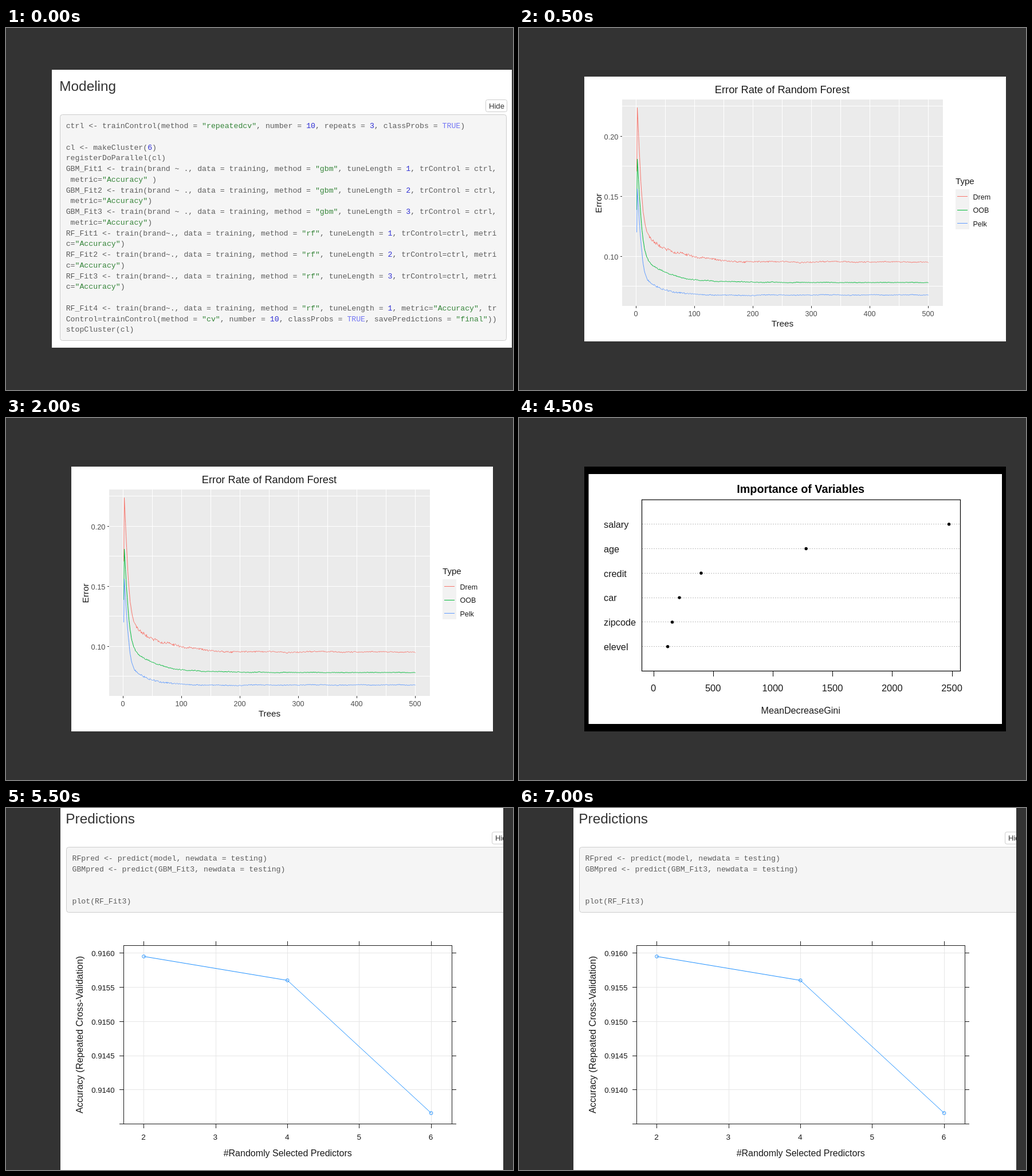
An HTML page for the animation above (8 s loop, 885x633 px).

```html
<!DOCTYPE html>
<html lang="en">
<head>
<meta charset="utf-8">
<title>Modeling slides</title>
<style>
  html, body { margin: 0; width: 100%; height: 100%; overflow: hidden; background: #333; }
  svg { display: block; width: 885px; height: 633px; }
  text { font-family: "Liberation Sans", Arial, sans-serif; white-space: pre; }
  .code { font: 13.2px "Liberation Mono", "Courier New", monospace; fill: #5c5c5c; }
  .str { fill: #36853a; }
  .num { fill: #3030d4; }
  .lit { fill: #7376f4; }
</style>
</head>
<body>
<svg id="stage" viewBox="0 0 885 633"></svg>
<script>
const escape = s => s.replace(/&/g, "&amp;").replace(/</g, "&lt;");
const rect = (x, y, w, h, fill, extra = "") =>
  `<rect x="${x}" y="${y}" width="${w}" height="${h}" fill="${fill}" ${extra}/>`;
const line = (x1, y1, x2, y2, color, extra = "") =>
  `<path d="M${x1} ${y1}L${x2} ${y2}" stroke="${color}" shape-rendering="crispEdges" ${extra}/>`;
const polyline = (points, color) =>
  `<polyline points="${points.join(" ")}" fill="none" stroke="${color}"/>`;
const text = (s, x, y, size, anchor = "start", fill = "#1a1a1a", extra = "") =>
  `<text x="${x}" y="${y}" font-size="${size}" text-anchor="${anchor}" fill="${fill}" ${extra}>${escape(s)}</text>`;
const upright = (s, x, y, size) =>
  text(s, 0, 0, size, "middle", "#1a1a1a", `transform="translate(${x} ${y}) rotate(-90)"`);
const each = (items, draw) => items.map(draw).join("");
const range = n => [...Array(n).keys()];

function highlight(source) {
  return escape(source).replace(/("[^"]*")|\b(TRUE)\b|\b\d+\b/g, (token, str, lit) =>
    `<tspan class="${str ? "str" : lit ? "lit" : "num"}">${token}</tspan>`);
}

const codeBlock = (source, x, y) => each(source.split("\n"), (row, i) =>
  `<text class="code" x="${x}" y="${y + i * 18.75}">${highlight(row)}</text>`);

const outlined = (x, y, w, h, fill, radius) =>
  rect(x, y, w, h, fill, `rx="${radius}" stroke="#ccc"`);

const heading = (s, x, y) => text(s, x, y, 24.4, "start", "#333");

const hideButton = (x, y) =>
  outlined(x, y, 37, 21, "#fff", 3) + text("Hide", x + 5.5, y + 15, 13.1, "start", "#333");

function modelingSlide() {
  const gbm = (n, end) => `GBM_Fit${n} <- train(brand ~ ., data = training, method = "gbm", tuneLength = ${n}, trControl = ctrl,
 metric="Accuracy"${end}`;
  const rf = n => `RF_Fit${n} <- train(brand~., data = training, method = "rf", tuneLength = ${n}, trControl=ctrl, metri
c="Accuracy")`;
  const source = `ctrl <- trainControl(method = "repeatedcv", number = 10, repeats = 3, classProbs = TRUE)

cl <- makeCluster(6)
registerDoParallel(cl)
${gbm(1, " )")}
${gbm(2, ")")}
${gbm(3, ")")}
${rf(1)}
${rf(2)}
${rf(3)}

RF_Fit4 <- train(brand~., data = training, method = "rf", tuneLength = 1, metric="Accuracy", tr
Control=trainControl(method = "cv", number = 10, classProbs = TRUE, savePredictions = "final"))
stopCluster(cl)`;
  return rect(80, 73, 803, 486, "#fff") +
    heading("Modeling", 93.2, 110) + hideButton(837.5, 125.5) +
    outlined(94.5, 151.5, 779, 395, "#f5f5f5", 4) +
    codeBlock(source, 104.7, 175);
}

// Small seeded generator giving values in -1..1.
function makeNoise(seed) {
  return () => {
    seed = (seed * 16807) % 2147483647;
    return seed / 1073741823.5 - 1;
  };
}

// An early spike and a slower tail above a floor, roughened by a drifting noise.
function errorCurve({ floor, spike, tail, span, rough }, seed) {
  const noise = makeNoise(seed);
  let drift = 0;
  return range(500).map(i => {
    const tree = i + 1;
    const rise = spike * Math.exp(-((tree / 8) ** 1.5)) + tail * Math.exp(-tree / span);
    const strength = rough * (0.4 + Math.exp(-tree / 130));
    drift = drift * 0.96 + noise() * strength * 0.35;
    const wobble = tree > 4 ? drift + noise() * strength : 0;
    const y = floor - rise * (tree > 1 ? 1 : 0.55) + wobble;
    return [(204.5 + tree * 1.02).toFixed(1), y.toFixed(1)];
  });
}

function errorSlide() {
  const series = [
    { name: "Drem", color: "#f8766d", floor: 409.5, spike: 230, tail: 70, span: 50, rough: 2 },
    { name: "OOB", color: "#00ba38", floor: 445, spike: 180, tail: 60, span: 40, rough: 0.9 },
    { name: "Pelk", color: "#619cff", floor: 467, spike: 163, tail: 45, span: 30, rough: 1.3 },
  ];
  const grid = each(range(11), i => line(204.5 + i * 51, 125, 204.5 + i * 51, 486, "#fff")) +
    each(range(7), i => line(180, 136.8 + i * 52.45, 740, 136.8 + i * 52.45, "#fff"));
  const xAxis = each(range(6), i => {
    const x = 204.5 + i * 102;
    return line(x, 486, x, 489.5, "#333") + text(`${i * 100}`, x - 0.5, 504, 12.6, "middle", "#4d4d4d");
  });
  const yAxis = each(["0.20", "0.15", "0.10"], (label, i) => {
    const y = 189.5 + i * 105;
    return line(176.5, y, 180, y, "#333") + text(label, 173.5, y + 5, 12.8, "end", "#4d4d4d");
  });
  const legend = each(series, ({ name, color }, i) => {
    const y = 294.5 + i * 23.5;
    return line(764.5, y, 782.5, y, color) + text(name, 792.5, y + 5, 12.5);
  });
  return rect(114, 85, 736, 463, "#fff") + rect(180, 125, 560, 361, "#ebebeb") +
    grid + xAxis + yAxis +
    each(series, (s, i) => polyline(errorCurve(s, 4711 + i * 97), s.color)) +
    text("Error Rate of Random Forest", 459.5, 114, 18.25, "middle") +
    text("Trees", 460, 522, 15.3, "middle") + upright("Error", 144, 306.5, 15.3) +
    text("Type", 762, 273, 15.1) + rect(762, 282, 24, 70, "#f2f2f2") + legend;
}

function importanceSlide() {
  const gini = { salary: 2474, age: 1277, credit: 398, car: 216, zipcode: 156, elevel: 118 };
  const toX = value => 235 + value * 0.2084;
  const rows = each(Object.entries(gini), ([name, value], i) => {
    const y = 185.7 + i * 42.8;
    return line(215, y, 770, y, "#bebebe", 'stroke-dasharray="2 2"') +
      `<circle cx="${toX(value)}" cy="${y}" r="2.7"/>` + text(name, 148, y + 6.3, 16.3);
  });
  const axis = each(range(6), i => {
    const x = toX(i * 500);
    return line(x, 442, x, 452, "#000") + text(`${i * 500}`, x - 0.5, 477.5, 16.5, "middle");
  });
  return rect(114, 85, 736, 463, "#000") + rect(121.5, 98, 721.5, 437, "#fff") + rows + axis +
    rect(214.5, 143, 556, 299.5, "none", 'stroke="#000" stroke-width="1.2"') +
    text("Importance of Variables", 491.7, 130.5, 19.75, "middle", "#000", 'font-weight="bold"') +
    text("MeanDecreaseGini", 491.7, 517.3, 16.2, "middle");
}

function predictionsSlide() {
  const source = `RFpred <- predict(model, newdata = testing)
GBMpred <- predict(GBM_Fit3, newdata = testing)


plot(RF_Fit3)`;
  const toX = predictors => 240.5 + (predictors - 2) * 125.4;
  const toY = accuracy => 253.6 + (0.916 - accuracy) * 119600;
  const points = [[2, 0.91595], [4, 0.9156], [6, 0.91366]].map(([n, accuracy]) => [toX(n), toY(accuracy)]);
  const blue = "#1e90ff", black = "#1a1a1a", grey = "#e6e6e6";
  const columns = each(range(5), i => {
    const x = toX(i + 2) + 0.2;
    return line(x, 240, x, 552, grey) + line(x, 233, x, 240, black) + line(x, 553, x, 560, black) +
      text(`${i + 2}`, x - 0.7, 580, 13.6, "middle");
  });
  const levels = each(range(6), i => {
    const accuracy = 0.916 - i * 0.0005, y = toY(accuracy);
    const ticks = line(197.5, y, 205, y, black) + line(778.5, y, 786, y, black);
    return i > 4 ? ticks : ticks + line(205, y, 778, y, grey) +
      text(accuracy.toFixed(4), 189.5, y + 5.4, 13.2, "end");
  });
  return `<clipPath id="page"><rect x="95" width="773" height="633"/></clipPath><g clip-path="url(#page)">` +
    rect(95, 0, 773, 633, "#fff") +
    heading("Predictions", 104.3, 27) +
    hideButton(848.5, 42) + outlined(105.5, 68.5, 780, 114, "#f5f5f5", 4) +
    codeBlock(source, 115.5, 92) + columns + levels +
    rect(205.5, 240.5, 573, 312, "none", `stroke="${black}"`) +
    polyline(points, blue) +
    each(points, ([x, y]) => `<circle cx="${x}" cy="${y}" r="2.8" fill="none" stroke="${blue}"/>`) +
    text("#Randomly Selected Predictors", 491.7, 608.5, 16, "middle") +
    upright("Accuracy (Repeated Cross-Validation)", 134, 396.5, 16.25) + "</g>";
}

const stage = document.getElementById("stage");
stage.innerHTML = each([modelingSlide, errorSlide, importanceSlide, predictionsSlide],
  slide => `<g class="slide">${slide()}</g>`);
const slides = stage.querySelectorAll(".slide");
const starts = [0, 500, 3000, 5500];

function show() {
  const t = performance.now() % 8000;
  const current = starts.filter(start => t >= start).length - 1;
  slides.forEach((slide, i) => slide.style.display = i === current ? "" : "none");
  requestAnimationFrame(show);
}
show();
</script>
</body>
</html>
```
